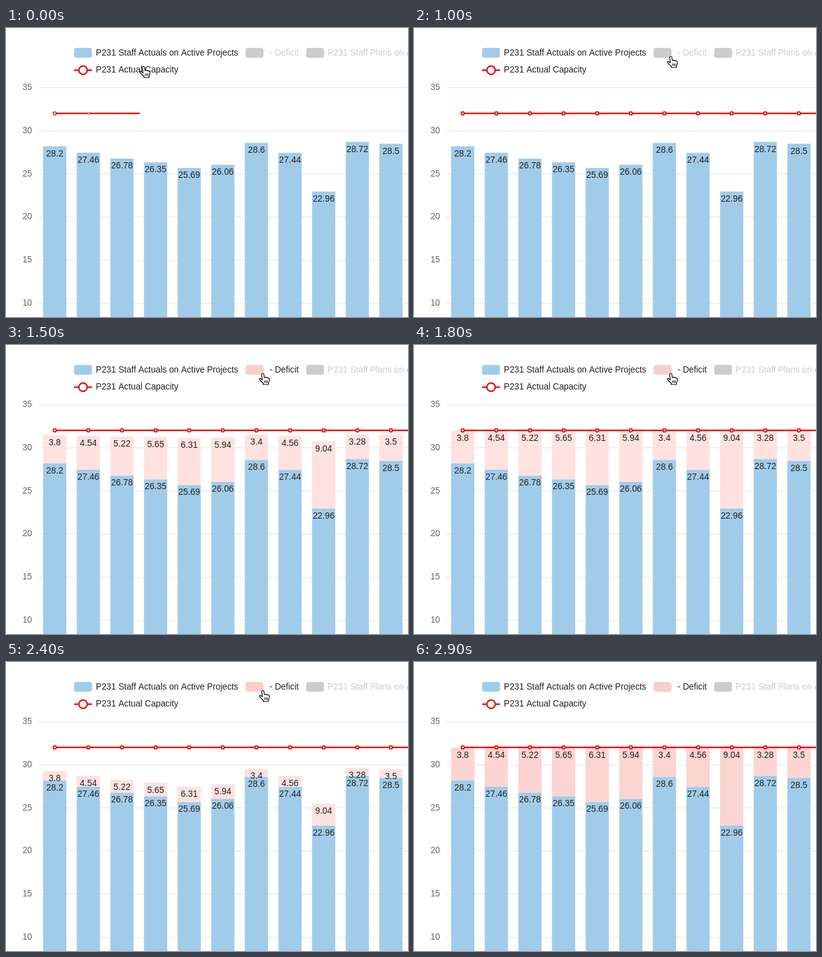
Write an HTML page with a canvas that moves like this. It is 640x461 px and loops after 3460 ms.

```html
<!DOCTYPE html>
<html lang="en">
<head>
<meta charset="utf-8">
<title>Staff capacity chart</title>
<style>
  html, body { margin: 0; width: 100%; height: 100%; overflow: hidden; background: #fff; }
  canvas { display: block; }
</style>
</head>
<body>
<canvas id="stage" width="640" height="461"></canvas>
<script>
const ctx = document.getElementById('stage').getContext('2d');

const LOOP = 3460, STEP = 100;
const CAPACITY = 32;
const ACTUALS = [28.2, 27.46, 26.78, 26.35, 25.69, 26.06, 28.6, 27.44, 22.96, 28.72, 28.5];
const BLUE = '#a1cce9', RED = '#e01010', GREY = '#ccc', INK = '#222';
const PINK = '#fcd4d2', PALE_PINK = '#ffe2e0', LEGEND_PINK = '#f9cfce';
const BAR_WIDTH = 37;

const SHOWN = 1162, HIDDEN = 1900, SHOWN_AGAIN = 2194, POINTER_LEAVES = 2900;

const barX = i => 77.6 + 53.52 * i;
const valueY = v => 95.2 + (35 - v) * 13.76;
const clamp = v => Math.max(0, Math.min(1, v));
const mix = (a, b, p) => a + (b - a) * p;
const easeInOut = p => p < .5 ? 4 * p ** 3 : 1 - 4 * (1 - p) ** 3;

const hand = new Path2D('M-2 1.6Q0-1 1.5 1.5L2.3 7Q4 5.6 5.4 7.2Q7.2 6.2 8.2 8Q10.2 7.4 10.4 10Q10.4 13 8.8 15V18H.6V16Q-2.5 13.5-5.8 9.6Q-5.3 7.2-3 8.9L-.8 10.4Z');
const handCreases = new Path2D('M2.8 11.5V15.5M5 11.5V15.5M7.1 11.5V15.5');
const arrow = new Path2D('M0 0V15L3.5 11.8L6 18L8.8 16.8L6.2 11L10.4 10.7Z');

function text(str, x, y, color = INK, align = 'left', size = 13.75) {
  ctx.font = `${size}px "Liberation Sans", Arial, sans-serif`;
  ctx.textAlign = align;
  ctx.textBaseline = 'middle';
  ctx.fillStyle = color;
  ctx.fillText(str, x, y);
}

function rect(x, y, w, h, color) {
  ctx.fillStyle = color;
  ctx.fillRect(x, y, w, h);
}

function line(x1, x2, y, width = 2.4) {
  rect(x1, y - width / 2, x2 - x1, width, RED);
}

function ring(x, y, radius, width) {
  ctx.beginPath();
  ctx.arc(x, y, radius, 0, 2 * Math.PI);
  ctx.fillStyle = '#fff';
  ctx.fill();
  ctx.strokeStyle = RED;
  ctx.lineWidth = width;
  ctx.stroke();
}

function swatch(x, color) {
  ctx.beginPath();
  ctx.roundRect(x, 31.7, 28.6, 15.8, 4);
  ctx.fillStyle = color;
  ctx.fill();
}

function drawLegend(deficitOn) {
  swatch(108.3, BLUE);
  text('P231 Staff Actuals on Active Projects', 143, 40);
  swatch(381.3, deficitOn ? LEGEND_PINK : GREY);
  text('- Deficit', 419.5, 40, deficitOn ? INK : GREY);
  swatch(477.8, GREY);
  text('P231 Staff Plans on Active Projects', 512, 40, GREY);
  line(108.3, 137, 67.3);
  ring(122.7, 67.3, 6.7, 2.3);
  text('P231 Actual Capacity', 143, 67.4);
}

function drawAxis() {
  for (let v = 10; v <= 35; v += 5) {
    rect(51, valueY(v) - .5, 589, 1, '#e2e4e8');
    text(v, 41.5, valueY(v), '#666', 'right');
  }
}

function drawBars(growth, deficitColor) {
  ACTUALS.forEach((v, i) => {
    const left = barX(i) - BAR_WIDTH / 2, top = valueY(v);
    const deficitTop = mix(top, valueY(CAPACITY), growth);
    rect(left, top, BAR_WIDTH, 461 - top, BLUE);
    if (growth) rect(left, deficitTop, BAR_WIDTH, top - deficitTop, deficitColor);
    text(v, barX(i), top + 12.3, INK, 'center', 13.9);
    if (growth) text(+(CAPACITY - v).toFixed(2), barX(i), deficitTop + 12.3, INK, 'center', 13.9);
  });
}

function drawCapacity(t) {
  const y = valueY(CAPACITY) - .3;
  const reach = 213 + 1.2 * t + .0027 * t * t;
  const radius = mix(3.4, 2.4, clamp((t - 600) / 200));
  line(barX(0), Math.min(640, reach), y);
  ACTUALS.forEach((_, i) => {
    const scale = clamp((reach - barX(i)) / 190);
    if (scale) ring(barX(i), y, radius * scale, 2 * scale);
  });
}

function drawPointer(t) {
  if (t >= POINTER_LEAVES) return;
  const p = easeInOut(clamp((t - 600) / 400));
  const resting = t < 600;
  const x = resting ? 219 : mix(297, 409, p);
  const y = resting ? 61 : mix(66, 45, p);
  const isHand = resting || (x > 381 && y < 48);
  ctx.save();
  ctx.translate(x, y);
  ctx.lineJoin = 'round';
  ctx.lineWidth = 1.2;
  ctx.fillStyle = isHand ? '#fff' : '#000';
  ctx.strokeStyle = isHand ? '#000' : '#fff';
  const shape = isHand ? hand : arrow;
  ctx.fill(shape);
  ctx.stroke(shape);
  if (isHand) {
    ctx.lineWidth = 1;
    ctx.stroke(handCreases);
  }
  ctx.restore();
}

function deficitGrowth(t) {
  if (t < SHOWN || (t >= HIDDEN && t < SHOWN_AGAIN)) return 0;
  const start = t < HIDDEN ? SHOWN : SHOWN_AGAIN;
  const growth = easeInOut(clamp((t - start) / 500));
  return growth < .001 ? 0 : growth;
}

function draw(now) {
  const t = Math.floor(now % LOOP / STEP) * STEP;
  const deficitOn = t >= SHOWN && (t < HIDDEN || t >= SHOWN_AGAIN);
  rect(0, 0, 640, 461, '#fff');
  drawAxis();
  drawBars(deficitGrowth(t), t < POINTER_LEAVES ? PALE_PINK : PINK);
  drawCapacity(t);
  drawLegend(deficitOn);
  drawPointer(t);
}

let start;
function tick(now) {
  start ??= now;
  draw(now - start);
  requestAnimationFrame(tick);
}
draw(0);
requestAnimationFrame(tick);
</script>
</body>
</html>
```
